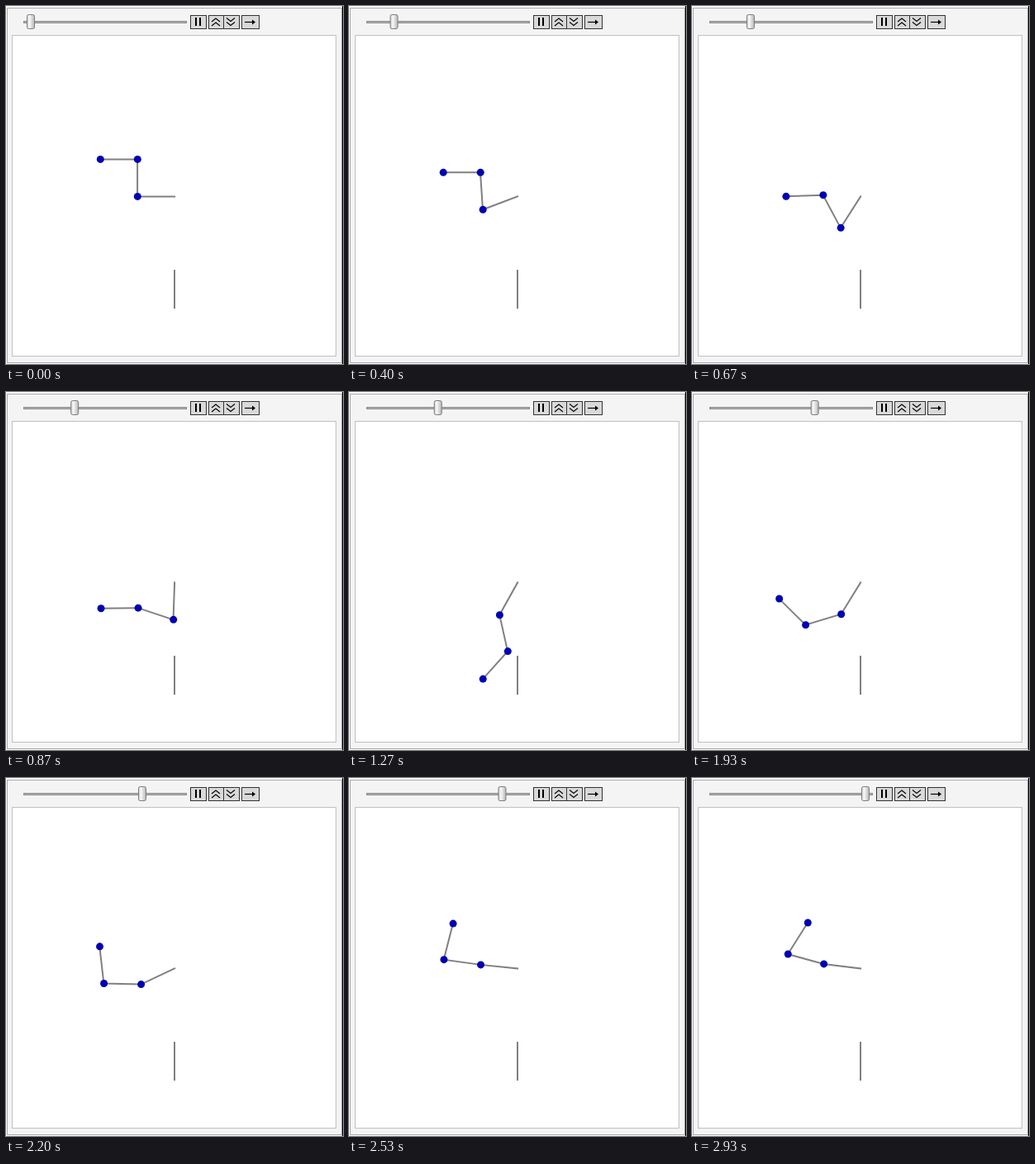
Recreate the animation shown at these times as an HTML page with a canvas. Size 408 px wide and 433 px high, loop 2990 ms.

```html
<!DOCTYPE html>
<html>
<head>
<meta charset="utf-8">
<title>Triple pendulum and wall</title>
<style>
html, body { margin: 0; width: 100%; height: 100%; overflow: hidden; background: #fff; }
canvas { display: block; }
</style>
</head>
<body>
<canvas id="stage" width="408" height="433"></canvas>
<script>
const LOOP = 2990, STEPS = 44, ROD = 45, PIVOT = [204.1, 230.4];
const rad = d => d * Math.PI / 180;
const sum = a => a.reduce((x, y) => x + y, 0);
const dot = (a, b) => sum(a.map((x, i) => x * b[i]));

// Known rod angles in degrees from straight down, left positive, by step
const KEYS = Object.entries({
  0: [90, 180, 90], 6: [69.4, 176.2, 90], 13: [2, 108.4, 89.3], 19: [29.1, -12.7, 42],
  24: [15.4, 37.9, 42.3], 33: [64.8, 91.3, 173.5], 44: [97, 105.3, 212.3]
}).map(([k, a]) => ({ k: +k, a: a.map(rad) }));

// Gaussian elimination with pivoting
function solve(A, b) {
  const n = b.length, m = A.map((row, i) => [...row, b[i]]);
  for (let c = 0; c < n; c++) {
    let p = c;
    for (let r = c + 1; r < n; r++) if (Math.abs(m[r][c]) > Math.abs(m[p][c])) p = r;
    [m[c], m[p]] = [m[p], m[c]];
    for (let r = c + 1; r < n; r++) {
      const f = m[r][c] / m[c][c];
      for (let j = c; j <= n; j++) m[r][j] -= f * m[c][j];
    }
  }
  const x = Array(n).fill(0);
  for (let r = n - 1; r >= 0; r--) {
    let v = m[r][n];
    for (let j = r + 1; j < n; j++) v -= m[r][j] * x[j];
    x[r] = v / m[r][r];
  }
  return x;
}

// Levenberg-Marquardt least squares
function fit(p, err) {
  let damp = 1e-3, r = err(p), cost = dot(r, r);
  for (let n = 0; n < 40; n++) {
    const J = p.map((_, i) => {
      const h = 1e-6, e = err(p.map((v, j) => i === j ? v + h : v));
      return e.map((v, j) => (v - r[j]) / h);
    });
    const A = J.map((a, i) => J.map((b, j) => dot(a, b) * (i === j ? 1 + damp : 1)));
    const d = solve(A, J.map(a => -dot(a, r)));
    const q = p.map((v, i) => v + d[i]), e = err(q), c = dot(e, e);
    if (c < cost) { p = q; r = e; cost = c; damp /= 5; } else damp *= 5;
  }
  return p;
}

// Three equal masses; state = 3 angles, 3 angular speeds, time in steps
let gravity = 9.81 * (2 / STEPS) ** 2;
const share = (i, j) => 3 - Math.max(i, j);
const mass = th => th.map((a, i) => th.map((b, j) => share(i, j) * Math.cos(a - b)));

function rate(s) {
  const th = s.slice(0, 3), w = s.slice(3);
  const force = th.map((a, i) => -gravity * share(i, i) * Math.sin(a)
    - sum(th.map((b, j) => share(i, j) * Math.sin(a - b) * w[j] * w[j])));
  return [...w, ...solve(mass(th), force)];
}

const add = (s, d, h) => s.map((v, i) => v + d[i] * h);

function step(s, h) {
  const a = rate(s), b = rate(add(s, a, h / 2)), c = rate(add(s, b, h / 2)), d = rate(add(s, c, h));
  return s.map((v, i) => v + h / 6 * (a[i] + 2 * b[i] + 2 * c[i] + d[i]));
}

function run(s, time) {
  const n = Math.ceil(time / 0.1);
  for (let i = 0; i < n; i++) s = step(s, time / n);
  return s;
}

// Angle errors at the given keys for a path leaving state s at time t
function misses(s, t, keys) {
  return keys.flatMap(({ k, a }) => {
    s = run(s, k - t);
    t = k;
    return a.map((v, i) => s[i] - v);
  });
}

function swing() {
  const rest = [...KEYS[0].a, 0, 0, 0];
  [gravity] = fit([gravity], ([g]) => {
    gravity = g;
    return misses(rest, 0, KEYS.slice(1, 4));
  });

  // Fall until the last bob reaches the wall
  let hit = 19, s = run(rest, hit);
  while (sum(s.slice(0, 3).map(Math.sin)) > 0 && hit < 23.5) {
    s = step(s, 0.02);
    hit += 0.02;
  }

  // Elastic bounce, then refine the speeds
  const th = s.slice(0, 3), push = th.map(Math.cos), turn = solve(mass(th), push);
  let w = add(s.slice(3), turn, -2 * dot(push, s.slice(3)) / dot(push, turn));
  for (const end of [6, 7])
    w = fit(w, v => misses([...th, ...v], hit, KEYS.slice(4, end)));
  const bounced = [...th, ...w];

  const free = k => (k < hit ? run(rest, k) : run(bounced, k - hit)).slice(0, 3);
  const drift = KEYS.map(({ k, a }) => ({ k, d: add(a, free(k), -1) }));
  drift.splice(4, 0, { k: hit, d: [0, 0, 0] });

  // Ease the small remaining drift away between keys
  return Array.from({ length: STEPS + 1 }, (_, k) => {
    const i = Math.max(1, drift.findIndex(e => e.k >= k)), p = drift[i - 1], q = drift[i];
    const u = (k - p.k) / (q.k - p.k);
    return free(k).map((v, j) => v + p.d[j] * (1 - u) + q.d[j] * u);
  });
}

const poses = swing();
const g = document.getElementById('stage').getContext('2d');

function box(x, y, w, h, fill, edge) {
  g.fillStyle = fill;
  g.fillRect(x, y, w, h);
  if (!edge) return;
  g.strokeStyle = edge;
  g.lineWidth = 1;
  g.strokeRect(x + 0.5, y + 0.5, w - 1, h - 1);
}

function line(points, color, width) {
  g.beginPath();
  points.forEach(p => g.lineTo(...p));
  g.strokeStyle = color;
  g.lineWidth = width;
  g.stroke();
}

function controls(k) {
  box(21, 18, 198, 3, '#8a8a8a');
  box(22, 19, 196, 1, '#b4b4b4');

  const x = 30 + 180 * k / STEPS, shine = g.createLinearGradient(x - 5, 0, x + 5, 0);
  shine.addColorStop(0, '#c8c8c8');
  shine.addColorStop(0.35, '#f8f8f8');
  shine.addColorStop(1, '#b0b0b0');
  g.beginPath();
  g.roundRect(x - 4.5, 10.5, 9, 17, 2);
  g.fillStyle = shine;
  g.fill();
  g.strokeStyle = '#7c7c7c';
  g.lineWidth = 1;
  g.stroke();

  for (const [left, width] of [[223, 20], [245, 19], [263, 20], [285, 22]])
    box(left, 11, width, 17, '#d9d9d9', '#333');
  box(229, 14, 2, 10, '#000');
  box(234, 14, 2, 10, '#000');
  for (const y of [15, 20]) {
    line([[249, y + 4], [254, y], [259, y + 4]], '#000', 1.1);
    line([[267, y - 0.5], [272, y + 3.5], [277, y - 0.5]], '#000', 1.1);
  }
  line([[289, 19.5], [299, 19.5]], '#000', 1.2);
  g.beginPath();
  g.moveTo(298, 16.5);
  g.lineTo(302, 19.5);
  g.lineTo(298, 22.5);
  g.fillStyle = '#000';
  g.fill();
}

function draw(k) {
  box(0, 0, 408, 433, '#fff');
  box(1, 2, 406, 430, '#f4f4f4', '#a8a8a8');
  box(407, 0, 1, 433, '#000');
  box(7, 35, 393, 389, '#fff', '#c0c0c0');
  controls(k);

  box(203, 319, 2, 47, '#808080');
  const joints = [PIVOT];
  poses[k].forEach((a, i) => {
    const [x, y] = joints[i];
    joints.push([x - ROD * Math.sin(a), y + ROD * Math.cos(a)]);
  });
  g.lineCap = 'square';
  line(joints, '#808080', 2);
  g.lineCap = 'butt';
  g.fillStyle = '#0000b0';
  for (const [x, y] of joints.slice(1)) {
    g.beginPath();
    g.arc(x + 0.2, y, 4.5, 0, 7);
    g.fill();
  }
}

const startOf = k => Math.round(k * 20 / 3) * 10;

function tick() {
  const t = performance.now() % LOOP;
  let k = STEPS;
  while (startOf(k) > t) k--;
  draw(k);
  requestAnimationFrame(tick);
}
tick();
</script>
</body>
</html>
```
